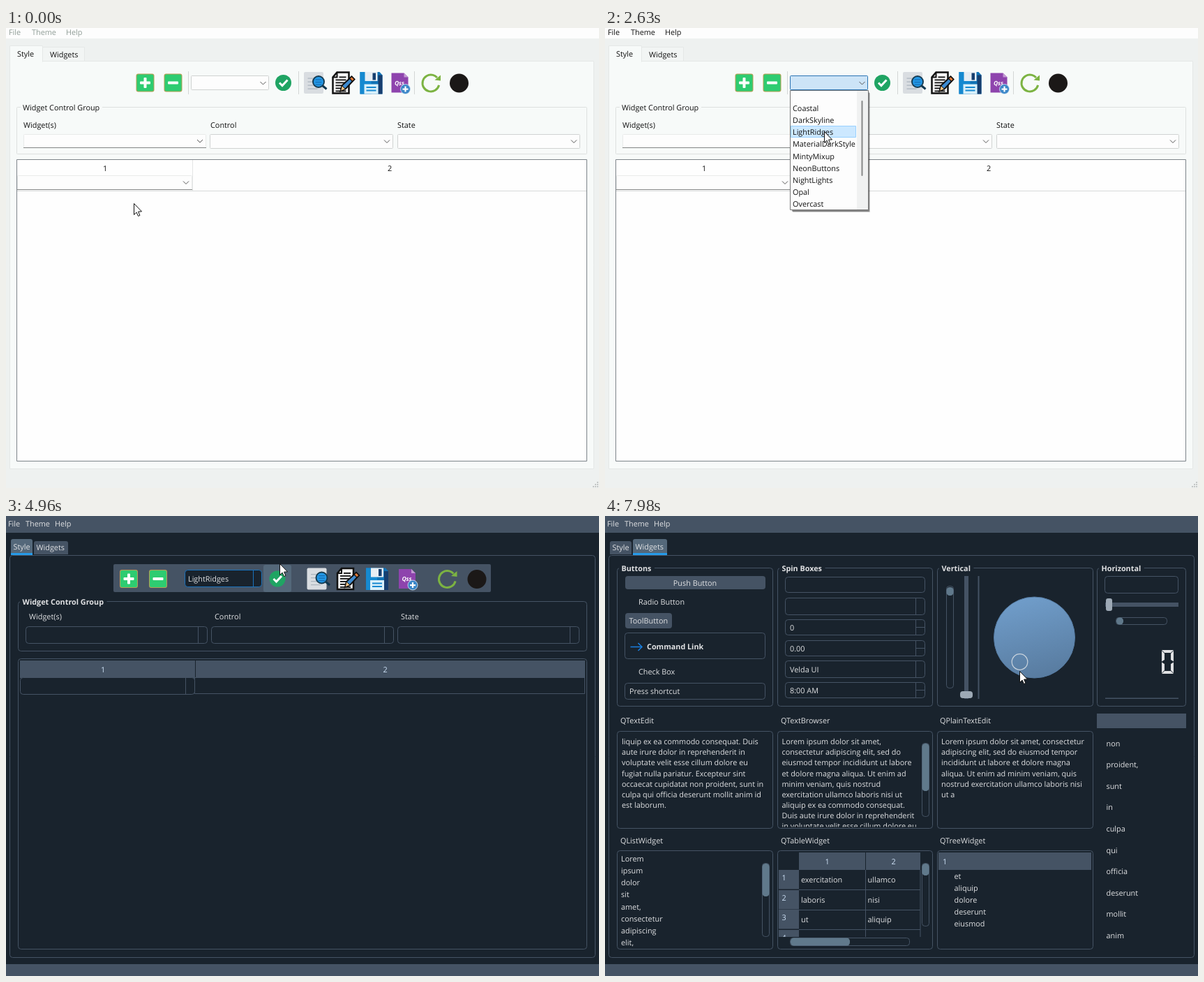
These frames come from a looping animation (850x659 px, 8 s). An HTML page with a canvas:

```html
<!DOCTYPE html>
<html lang="en">
<head>
<meta charset="utf-8">
<title>Style editor</title>
<style>
html, body { margin: 0; width: 100%; height: 100%; overflow: hidden; background: #eef1f0; }
canvas { display: block; }
</style>
</head>
<body>
<canvas id="stage" width="850" height="659"></canvas>
<script>
const ctx = document.getElementById('stage').getContext('2d');
const LOOP = 8000;
const REGULAR = '10.85px "Open Sans", "Noto Sans", sans-serif';
const BOLD = 'bold 10.8px "Open Sans", "Noto Sans", sans-serif';
const BG = '#19232d', EDGE = '#455364', HOT = '#54687a', INK = '#e0e1e3', KNOB = '#60798b';
const PICK = 'LightRidges';
const THEMES = ['Coastal', 'DarkSkyline', PICK, 'MaterialDarkStyle', 'MintyMixup',
  'NeonButtons', 'NightLights', 'Opal', 'Overcast'];

// Each step adds to the state before it; the pointer jumps between places.
const steps = [
  { t: 0, at: [183, 251], combo: '#fdfdfd', edge: '#cfd2d1', menu: '#8f9c96' },
  { t: 650, at: [232, 148] },
  { t: 980, at: [288, 66], combo: '#f2f8fd', edge: '#7ab5e5' },
  { t: 1310, at: [294, 76], combo: '#e8f3fc', edge: '#2f8bd6' },
  { t: 1640, at: [296, 79], combo: '#e5f1fb' },
  { t: 1970, open: true, row: -1, combo: '#d6e9f9', edge: '#2a74b4', menu: '#111' },
  { t: 2300, at: [307, 108], row: 0, combo: '#cce4f7' },
  { t: 2630, at: [314, 148], row: 2, bar: true },
  { t: 3630, at: [314, 150] },
  { t: 3960, at: [314, 148], open: false, text: PICK, combo: '#e5f1fb', edge: '#2f8bd6' },
  { t: 4290, at: [375, 87], combo: '#f2f8fd', edge: '#9cc6e8' },
  { t: 4620, at: [392, 68], combo: '#fdfdfd', edge: '#cfd2d1', apply: true },
  { t: 4960, dark: true },
  { t: 5290, at: [392, 70] },
  { t: 5620, at: [239, 101], apply: false },
  { t: 5960, at: [75, 52] },
  { t: 6300, at: [53, 49], widgets: true },
  { t: 7300, at: [75, 122] },
  { t: 7640, at: [350, 153], spin: true },
  { t: 7980, at: [594, 222], spin: false }
];

function stateAt(t) {
  return Object.assign({}, ...steps.filter(s => s.t <= t));
}

function fill(x, y, w, h, color, r = 0) {
  ctx.fillStyle = color;
  ctx.beginPath();
  ctx.roundRect(x, y, w, h, r);
  ctx.fill();
}

// Outline on pixel centres, given by its outer corner pixels.
function frame(x1, y1, x2, y2, color = EDGE, r = 4, inside) {
  ctx.beginPath();
  ctx.roundRect(x1 + .5, y1 + .5, x2 - x1, y2 - y1, r);
  if (inside) { ctx.fillStyle = inside; ctx.fill(); }
  ctx.strokeStyle = color;
  ctx.lineWidth = 1;
  ctx.stroke();
}

function path(points, color, width = 1, closed = false, inside) {
  ctx.beginPath();
  for (let i = 0; i < points.length; i += 2) ctx.lineTo(points[i], points[i + 1]);
  if (closed) ctx.closePath();
  if (inside) { ctx.fillStyle = inside; ctx.fill(); }
  if (color) { ctx.strokeStyle = color; ctx.lineWidth = width; ctx.stroke(); }
}

function disc(x, y, r, color, stroke, width = 1) {
  ctx.beginPath();
  ctx.arc(x, y, r, 0, 7);
  if (color) { ctx.fillStyle = color; ctx.fill(); }
  if (stroke) { ctx.strokeStyle = stroke; ctx.lineWidth = width; ctx.stroke(); }
}

function text(str, x, y, color = INK, font = REGULAR, align = 'left') {
  ctx.font = font;
  ctx.fillStyle = color;
  ctx.textAlign = align;
  ctx.fillText(str, x, y);
}

function lines(list, x, y, step, color) {
  list.forEach((s, i) => text(s, x, y + i * step, color));
}

function clipped(x, y, w, h, draw) {
  ctx.save();
  ctx.beginPath();
  ctx.rect(x, y, w, h);
  ctx.clip();
  draw();
  ctx.restore();
}

function chevron(x, y) {
  path([x - 4, y - 2, x, y + 2, x + 4, y - 2], '#555');
}

// Toolbar icons, drawn around their own centre.
function badge(minus) {
  fill(-13, -13, 26, 26, '#b59f55', 3);
  fill(-12, -12, 24, 24, '#2ecc71', 2.5);
  fill(-7.5, -2, 15, 4, '#fff', 1);
  if (!minus) fill(-2, -7.5, 4, 15, '#fff', 1);
}

const icons = {
  plus() { badge(false); },
  minus() { badge(true); },
  check() {
    disc(0, 0, 11.5, '#1fa463');
    path([-5.5, 0, -1.5, 4, 6, -4], '#fff', 3);
  },
  search() {
    fill(-16.5, -15.5, 28, 31, '#d9dde1', 2);
    for (let y = -7; y < 9; y += 5) fill(-11, y, 14, 1.2, '#aab4bd');
    path([10, 4, 16, 9], '#12384f', 3);
    disc(4.5, -1.5, 8, '#2398e6', '#173c52', 2);
    for (let y = -5; y < 4; y += 3.5) fill(0, y, 9, 1.2, '#146ab0');
  },
  edit() {
    path([-9, -15, 8, -15, 8, 15, -15, 15, -15, -8], '#111', 2.5, true, '#f5f5f5');
    path([-9, -15, -9, -8, -15, -8], '#111', 2);
    for (let y = -9; y < 12; y += 4) fill(y < -6 ? -6 : -11, y, y < -6 ? 10 : 15, 1.8, '#111');
    path([-4, 12, -2, 4, 12, -9, 16, -5, 3, 9], '#111', 2, true, '#3e8bd0');
    path([9, -6, 12, -9, 16, -5, 13, -2], '#111', 1.2, true, '#e57c3a');
    path([-4, 12, -2, 4, 3, 9], '#111', 1, true, '#f3c387');
  },
  save() {
    path([-16, -15.5, 12, -15.5, 16, -11, 16, 16, -16, 16], null, 0, true, '#1273b5');
    path([-16, -15.5, 0, -15.5, 0, 16, -16, 16], null, 0, true, '#1689d0');
    fill(10, -11, 6, 27, '#173e6e');
    fill(-9, -15.5, 18, 13, '#e8eef3');
    fill(2, -14, 4.5, 10, '#173e6e');
    fill(-10, 2, 20, 14, '#d9f0fa');
    fill(-7, 5.5, 14, 2, '#1689d0');
    fill(-7, 10, 14, 2, '#1689d0');
  },
  qss() {
    path([-13, -14, 5, -14, 11, -8, 11, 14, -13, 14], null, 0, true, '#8e44ad');
    path([5, -14, 11, -8, 5, -8], null, 0, true, '#c39bd3');
    text('Qss', -1.5, 3, '#fff', 'italic bold 8.5px "Open Sans", sans-serif', 'center');
    disc(7, 9, 7, '#3b87c8', '#dcebf6', .8);
    fill(3, 8, 8, 2.2, '#fff');
    fill(5.9, 5, 2.2, 8, '#fff');
  },
  refresh() {
    ctx.beginPath();
    ctx.arc(-.5, .5, 12, .25, 5.55);
    ctx.strokeStyle = '#7cb342';
    ctx.lineWidth = 3;
    ctx.stroke();
    path([13.5, -11, 13.5, -3, 5, -4], null, 0, true, '#7cb342');
  },
  link() { disc(0, .5, 13.5, '#1b1817'); }
};

function toolbar(centers, y) {
  Object.keys(icons).forEach((name, i) => {
    ctx.save();
    ctx.translate(centers[i], y);
    icons[name]();
    ctx.restore();
  });
}

function lightCombo(x1, y1, x2, y2, editable) {
  frame(x1, y1, x2, y2, editable ? '#e9ebea' : '#d0d3d2', 1, '#fdfdfd');
  if (editable) fill(x1, y2, x2 - x1 + 1, 1, '#838685');
  chevron(x2 - 8, (y1 + y2) / 2 + .5);
}

function popup(s) {
  fill(269, 93, 111, 171, 'rgba(0,0,0,.2)', 1);
  fill(268, 92, 111, 171, 'rgba(0,0,0,.35)', 1);
  frame(265, 89, 377, 260, '#777', 0, '#fdfdfd');
  fill(361, 90, 16, 170, '#f0f1f1');
  const y = Math.round(106 + s.row * 17.15);
  frame(266, Math.max(y, 90), 359, y + 16, '#99d1ff', 0, '#cce8ff');
  lines(THEMES, 269, 119, 17.13, '#111');
  if (s.bar) fill(367.5, 104, 2, 108, '#858787', 1);
}

function lightPage(s) {
  const ink = '#111';
  fill(0, 0, 850, 659, '#eef1f0');
  fill(0, 0, 850, 15, '#fdfdfd');
  text('File', 4, 10, s.menu);
  text('Theme', 37, 10, s.menu);
  text('Help', 86, 10, s.menu);
  frame(5, 47, 842, 631, '#e5e8e7', 0, '#f7faf9');
  frame(52, 27, 112, 47, '#e5e8e7', 0, '#f2f5f4');
  frame(5, 25, 52, 48, '#e5e8e7', 0, '#f7faf9');
  fill(6, 46, 46, 4, '#f7faf9');
  text('Style', 16, 41, ink);
  text('Widgets', 63, 42, ink);
  for (const x of [261, 419, 585]) fill(x, 62, 1, 33, '#d3d6d5');

  frame(265, 68, 376, 88, s.edge, 1, s.combo);
  chevron(368.5, 79);
  if (s.text) text(s.text, 268, 83, ink);
  if (s.apply) frame(378, 59, 416, 96, '#cfe6f8', 2, '#e5f3fd');
  toolbar([199.5, 239.5, 397.5, 443.5, 483.5, 523.5, 565.5, 609.5, 649.5], 78.5);

  frame(15, 113, 832, 180, '#dde0df', 1);
  fill(21, 110, 117, 8, '#f7faf9');
  text('Widget Control Group', 24, 118, ink);
  text('Widget(s)', 25, 143, ink);
  text('Control', 293, 143, ink);
  text('State', 561, 143, ink);
  lightCombo(25, 152, 286, 171, true);
  lightCombo(292, 152, 554, 172);
  lightCombo(561, 152, 822, 172);

  frame(15, 188, 832, 620, '#7d848a', 0, '#fefefe');
  fill(267, 189, 1, 45, '#e3e5e5');
  fill(16, 233, 816, 1, '#d8dada');
  text('1', 142, 205, ink, REGULAR, 'center');
  text('2', 550, 205, ink, REGULAR, 'center');
  lightCombo(16, 211, 266, 231, true);
  for (let i = 0; i < 3; i++)
    for (let j = 0; j <= i; j++) fill(847 - j * 3, 650 + i * 3, 2, 2, '#c3c6c5');
  if (s.open) popup(s);
}

function darkTab(label, x, w, active) {
  fill(x, active ? 33 : 36, w, active ? 23 : 19, active ? HOT : EDGE, [3, 3, 0, 0]);
  if (active) fill(x, 53, w, 3, '#259ae9');
  text(label, x + 3.5, active ? 48 : 49);
}

function group(title, x1, y1, x2, y2) {
  frame(x1, y1, x2, y2);
  ctx.font = BOLD;
  fill(x1 + 3, y1 - 1, ctx.measureText(title).width + 8, 4, BG);
  text(title, x1 + 6.5, y1 + 5, INK, BOLD);
}

function field(x1, y1, x2, y2, split, color = EDGE) {
  frame(x1, y1, x2, y2, color, 4, BG);
  if (split) fill(split, y1 + 1, 1, y2 - y1, color);
}

function scroll(x1, y1, x2, y2, from, to, flat) {
  frame(x1, y1, x2, y2);
  if (flat) fill(from, y1 + .5, to - from, y2 - y1, KNOB, 4.5);
  else fill(x1 + .5, from, x2 - x1, to - from, KNOB, 4.5);
}

function stylePage(s) {
  fill(154, 69, 541, 40, EDGE, 2);
  if (s.apply) fill(369, 70, 40, 39, HOT, 3);
  field(256, 77, 366, 101, 354, '#1a72bb');
  text(s.text, 261, 94);
  toolbar([176, 218, 389, 448, 490, 532, 576, 633, 675], 90);

  group('Widget Control Group', 17, 122, 832, 193);
  text('Widget(s)', 33, 148);
  text('Control', 299, 148);
  text('State', 566, 148);
  field(28, 158, 288, 182, 275);
  field(294, 158, 555, 182, 542);
  field(561, 158, 821, 182, 808);
  frame(17, 204, 832, 620);
  fill(20, 207, 251, 25, EDGE);
  fill(272, 207, 558, 25, EDGE);
  text('1', 139, 224, '#cfe2f7', REGULAR, 'center');
  text('2', 543.5, 224, '#cfe2f7', REGULAR, 'center');
  frame(270, 231, 829, 254, EDGE, 0);
  field(20, 231, 270, 255, 257);
}

function buttons() {
  group('Buttons', 17, 74, 240, 272);
  fill(29, 86, 201, 19, EDGE, 4);
  text('Push Button', 129, 100, INK, REGULAR, 'center');
  text('Radio Button', 48, 127);
  fill(29, 139, 67, 22, EDGE, 4);
  text('ToolButton', 34.5, 154);
  field(28, 167, 229, 204);
  path([36.5, 187.5, 53, 187.5], '#1a7fe0', 1.5);
  path([47.5, 182, 53, 187.5, 47.5, 193], '#1a7fe0', 1.5);
  text('Command Link', 60, 191, INK, BOLD);
  text('Check Box', 48, 227);
  field(28, 239, 229, 262);
  text('Press shortcut', 35, 255);
}

function spinBoxes(hover) {
  group('Spin Boxes', 247, 74, 469, 272);
  const tops = [87, 117, 148, 178, 207, 238];
  const labels = ['', '', '0', '0.00', 'Velda UI', '8:00 AM'];
  tops.forEach((y, i) => {
    const h = i == 1 || i == 4 ? 24 : 22;
    const color = hover && i == 2 ? '#346792' : EDGE;
    field(258, y, 458, y + h, i && 445, color);
    if (i == 2 || i == 3 || i == 5) fill(445, y + 11, 13, 1, color);
    text(labels[i], 265, y + h / 2 + 5);
  });
}

function verticals() {
  group('Vertical', 476, 74, 699, 272);
  scroll(489, 100, 499, 246, 102, 114);
  fill(515, 86, 6, 176, EDGE);
  fill(509, 251, 18, 10, '#9da9b5', 4);
  fill(534.5, 86, 2, 176, EDGE);
  const shade = ctx.createLinearGradient(600, 116, 630, 232);
  shade.addColorStop(0, '#709dca');
  shade.addColorStop(1, '#587b9f');
  disc(615.5, 174, 58, shade, '#567ca3');
  disc(594.5, 209, 11.3, null, '#c9d3dd', 1.2);
}

function horizontals() {
  group('Horizontal', 705, 74, 832, 272);
  field(716, 86, 821, 110);
  fill(717, 124, 105, 6, EDGE);
  fill(718, 118, 9, 18, '#9da9b5', 3);
  scroll(732, 145, 805, 155, 733, 743, true);
  path([798, 192, 815, 192, 811, 196, 802, 196], null, 0, true, INK);
  path([798, 226, 815, 226, 811, 222, 802, 222], null, 0, true, INK);
  for (const [edge, inner] of [[798, 802], [815, 811]]) {
    path([edge, 193, inner, 197, inner, 206, edge, 208.5], null, 0, true, INK);
    path([edge, 209.5, inner, 212, inner, 221, edge, 225], null, 0, true, INK);
  }
  fill(717, 260.5, 105, 1.5, EDGE);
}

const LOREM = ['Lorem ipsum dolor sit amet,', 'consectetur adipiscing elit, sed do',
  'eiusmod tempor incididunt ut labore', 'et dolore magna aliqua. Ut enim ad',
  'minim veniam, quis nostrud', 'exercitation ullamco laboris nisi ut',
  'aliquip ex ea commodo consequat.', 'Duis aute irure dolor in reprehenderit',
  'in voluptate velit esse cillum dolore eu'];
const TAIL = ['liquip ex ea commodo consequat. Duis', 'aute irure dolor in reprehenderit in',
  'voluptate velit esse cillum dolore eu', 'fugiat nulla pariatur. Excepteur sint',
  'occaecat cupidatat non proident, sunt in', 'culpa qui officia deserunt mollit anim id',
  'est laborum.'];
const PLAIN = ['Lorem ipsum dolor sit amet, consectetur', 'adipiscing elit, sed do eiusmod tempor',
  'incididunt ut labore et dolore magna', 'aliqua. Ut enim ad minim veniam, quis',
  'nostrud exercitation ullamco laboris nisi', 'ut a'];

function editors() {
  ['QTextEdit', 'QTextBrowser', 'QPlainTextEdit'].forEach((s, i) => text(s, [22, 252, 480][i], 297));
  ['QListWidget', 'QTableWidget', 'QTreeWidget'].forEach((s, i) => text(s, [22, 252, 480][i], 468.5));
  for (const [a, b] of [[17, 240], [247, 469], [476, 699]]) {
    frame(a, 308, b, 447);
    frame(a, 479, b, 620);
  }
  lines(TAIL, 24, 327, 15.17);
  clipped(250, 310, 198, 135.5, () => lines(LOREM, 253.5, 327, 15.17));
  lines(PLAIN, 482, 327, 15.17);
  scroll(454, 325, 464, 430, 326, 394);
}

function table() {
  const rows = [['exercitation', 'ullamco'], ['laboris', 'nisi'], ['ut', 'aliquip'], ['', '']];
  fill(278, 482, 95, 25, EDGE);
  fill(374, 482, 78, 25, EDGE);
  text('1', 318.5, 499, '#cfe2f7', REGULAR, 'center');
  text('2', 413.5, 499, '#cfe2f7', REGULAR, 'center');
  clipped(249, 507, 204, 96, () => rows.forEach(([a, b], i) => {
    const y = Math.round(507 + i * 28.5);
    fill(249, y, 29, 27.5, EDGE);
    fill(278, y + 28, 174, 1, EDGE);
    text(i + 1, 253.5, y + 14.5, '#cfe2f7');
    text(a, 281, y + 18);
    text(b, 376.5, y + 18);
  }));
  fill(373, 507, 1, 96, EDGE);
  fill(451.5, 507, 1, 96, EDGE);
  scroll(454, 497, 464, 587, 498, 515);
  scroll(265, 604, 436, 615, 266, 351, true);
}

function widgetsPage(s) {
  buttons();
  spinBoxes(s.spin);
  verticals();
  horizontals();
  editors();
  lines('Lorem ipsum dolor sit amet, consectetur adipiscing elit,'.split(' '), 23, 495, 17.15);
  scroll(225, 497, 235, 602, 498, 545);
  table();
  fill(478, 482, 219, 25, EDGE);
  text('1', 484, 499, '#cfe2f7');
  lines('et aliquip dolore deserunt eiusmod'.split(' '), 500.5, 520, 17.1);
  fill(705, 283, 128, 21, EDGE);
  lines('non proident, sunt in culpa qui officia deserunt mollit anim'.split(' '), 718.5, 329.5, 30.6);
}

function darkWindow(s) {
  fill(0, 0, 850, 659, BG);
  fill(0, 0, 850, 24, EDGE);
  fill(0, 642, 850, 17, EDGE);
  text('File', 3, 14.5);
  text('Theme', 28, 14.5);
  text('Help', 70, 14.5);
  frame(5, 56, 844, 632);
  darkTab('Style', 7, 31, !s.widgets);
  darkTab('Widgets', 40, 49, s.widgets);
  if (s.widgets) widgetsPage(s); else stylePage(s);
}

function pointer(x, y) {
  ctx.save();
  ctx.translate(x + .5, y + .5);
  path([0, 0, 0, 16, 3.6, 12.6, 6, 18, 8.4, 17, 6.1, 11.6, 11, 11.4], '#111', 1, true, '#fff');
  ctx.restore();
}

function draw(now) {
  const s = stateAt(now % LOOP);
  ctx.textRendering = 'geometricPrecision';
  if (s.dark) darkWindow(s); else lightPage(s);
  pointer(...s.at);
  requestAnimationFrame(tick);
}

let start;
function tick(now) {
  start ??= now;
  draw(now - start);
}
requestAnimationFrame(tick);
</script>
</body>
</html>
```
